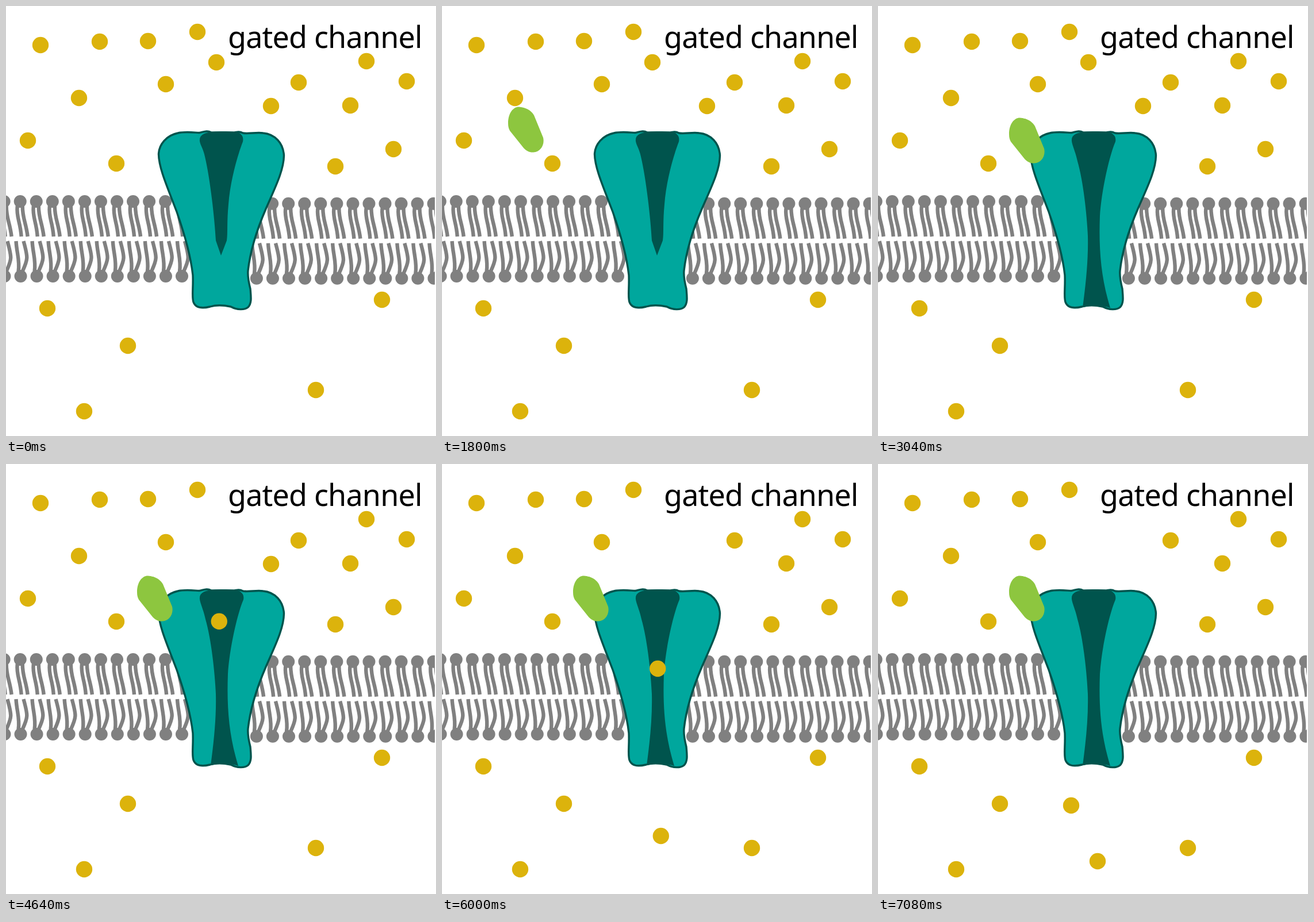
An HTML page for the animation above (7.96 s loop, 748 by 748 pixels).

```html
<!DOCTYPE html>
<html lang="en">
<head>
<meta charset="utf-8">
<title>Gated channel</title>
<style>
  html, body { margin: 0; width: 100%; height: 100%; overflow: hidden; background: #fff; }
  svg { display: block; width: 100vw; height: 100vh; }
  text { font: 52px "Noto Sans", "Open Sans", sans-serif; letter-spacing: -.8px; }

  .lipid circle { fill: #808080; }
  .lipid path { fill: none; stroke: #808080; stroke-width: 6.4; }
  .ball { fill: #dcb30c; }
  .wall { fill: #00a79d; stroke: #00544d; stroke-width: 3.4; stroke-linejoin: round; }
  .pore { fill: #00544d; }
  .ligand { fill: #8dc63f; }

  .closed, .open { animation: hide 7960ms infinite step-end; }
  .open { animation-name: show; }
  @keyframes hide { 0% { visibility: visible } 38.191%, 100% { visibility: hidden } }
  @keyframes show { 0% { visibility: hidden } 38.191%, 100% { visibility: visible } }

  .mover { offset-rotate: 0deg; animation: 7960ms linear infinite; }
  .ligand {
    offset-path: path("M-32 107 L63 167 C91 183.5 119 199.5 147 215.5 C185 236 225 242 259 234");
    animation-name: bind;
  }
  .first {
    offset-path: path("M366 98 L382 691");
    animation-name: pass;
  }
  .second {
    offset-path: path("M461 174 Q372 239 375 353 C382 440 385 530 336 594");
    animation-name: follow;
  }
  @keyframes bind {
    0% { offset-distance: 0% }
    6.5327% { offset-distance: 0%; animation-timing-function: steps(50) }
    31.6583%, 100% { offset-distance: 100% }
  }
  @keyframes pass {
    0% { offset-distance: 0% }
    50.2513% { offset-distance: 0%; animation-timing-function: steps(54) }
    77.3869%, 100% { offset-distance: 100% }
  }
  @keyframes follow {
    0% { offset-distance: 0% }
    63.8191% { offset-distance: 0%; animation-timing-function: steps(50) }
    88.9447%, 100% { offset-distance: 100% }
  }
</style>
</head>
<body>
<svg viewBox="0 0 748 748">
  <defs>
    <clipPath id="edge"><path d="M0 300H746V500H0Z"/></clipPath>
    <g id="upper" class="lipid">
      <circle r="11"/>
      <path d="M-5 8C-7 28 0 34 2 61M4 8C4 30 10 36 13 61"/>
    </g>
    <g id="lower" class="lipid">
      <circle r="11"/>
      <path d="M-4 -8C-1 -28 -7 -40 -8 -61M3 -8C13 -30 13 -32 5 -61"/>
    </g>
  </defs>

  <text x="386" y="73">gated channel</text>
  <g id="membrane" clip-path="url(#edge)"></g>

  <path class="wall" d="M357 220C350 216 344 219 336 220.5C326 220 312 218 299 221C279 225 266 241 265.5 258
    C266 283 282 318 297 358C310 395 321 432 325 468C326 490 323 505 326 515C330 526 343 526 355 523
    C368 519 382 521 391 523C402 529 415 529 421 524C428 517 426 505 425 492C422 480 420 470 421 460
    C425 425 436 390 452 353C466 320 483 288 483.5 260C482 238 468 223 447 221C436 219 422 223 412 221
    C405 217 401 220 397 220Z"/>
  <path class="pore closed" d="M345 222C358 217 395 217 406 221Q414 226 412 236C402 262 390 305 387 345
    C384 375 386 395 384 408L374 434L365 408C363 370 355 300 346 262C343 248 338 242 337 235Q336 226 345 222Z"/>
  <path class="pore open" d="M345 222C358 217 395 217 406 221Q415 226 413 236C402 262 389 320 386 365
    C384 420 387 470 404 525Q380 518 356 524C362 480 366 440 365 400C363 360 357 305 347 270
    C343 252 338 243 337 235Q336 226 345 222Z"/>

  <g id="balls"></g>
  <path class="mover ligand" d="M-31 -11C-31 -30 -21 -40 -12 -39.5C-2 -39 9 -34 14 -25L30 14
    C33 27 25 39 13 39.5C6 40 1 37 -4 32L-28 2Q-31 -3 -31 -11Z"/>
  <circle class="mover ball first" r="14.2"/>
  <circle class="mover ball second" r="14.2"/>
</svg>
<script>
  const fill = (id, parts) => document.getElementById(id).innerHTML = parts.join("");
  const pitch = 28.05;

  // One bilayer half: lipid pairs numbered from..to, shifted by dx, dy.
  const row = (from, to, dx, dy) => {
    const parts = [];
    for (let k = from; k <= to; k++) {
      const x = dx + k * pitch;
      parts.push(`<use href="#upper" x="${x + 24.7}" y="${340 + dy}"/>`,
                 `<use href="#lower" x="${x + 25.5}" y="${470 + dy}"/>`);
    }
    return parts;
  };
  fill("membrane", [...row(-1, 10, 0, 0), ...row(0, 11, 410.4, 3.7)]);

  const spots = [
    [60, 68], [163, 62], [247, 61], [333, 45], [278, 136], [127, 160], [38, 234],
    [192, 274], [509, 133], [627, 96], [697, 131], [599, 173], [674, 249], [573, 279],
    [654, 511], [72, 526], [212, 591], [136, 705], [539, 668]
  ];
  fill("balls", spots.map(([x, y]) => `<circle class="ball" cx="${x}" cy="${y}" r="14.2"/>`));
</script>
</body>
</html>
```
